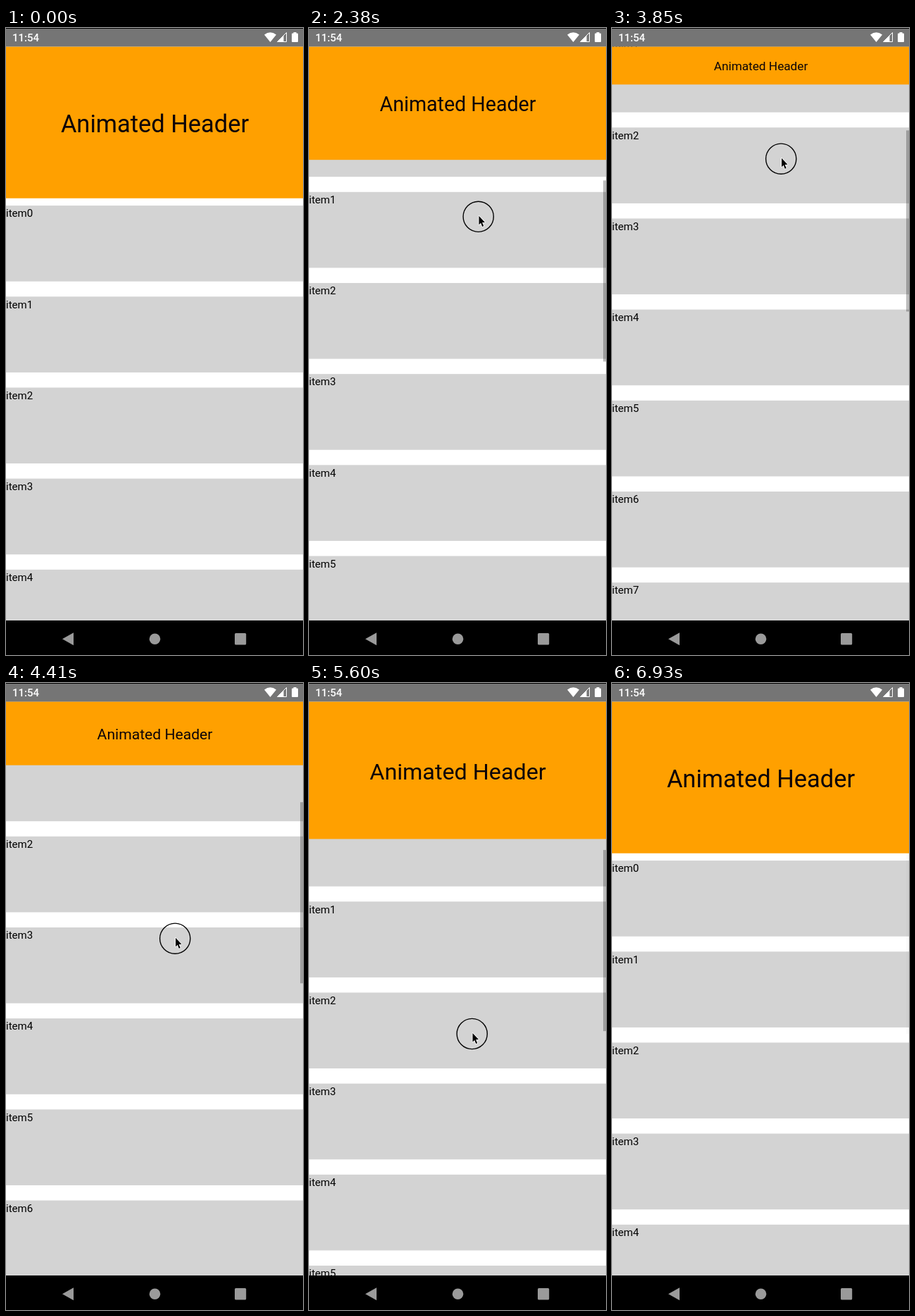
Animation of 422x890 px, one loop 7.21 s. Source, as an HTML page with a canvas:

```html
<!DOCTYPE html>
<html lang="en">
<head>
<meta charset="utf-8">
<title>Animated Header</title>
<style>
  html, body { margin: 0; width: 100%; height: 100%; overflow: hidden; background: #fff; }
  canvas { display: block; width: 422px; height: 890px; }
</style>
</head>
<body>
<canvas id="stage" width="422" height="890"></canvas>
<script>
const ctx = document.getElementById('stage').getContext('2d');
const LOOP = 7210, STEP = 70;
const WIDTH = 422, HEIGHT = 890, TOP = 26, BOTTOM = 841;
const DP = WIDTH / 392;
const HEADER_MAX = 200 * DP, HEADER_MIN = 50 * DP;
const ITEM = 100 * DP, MARGIN = 10 * DP, PITCH = 120 * DP;
const ITEMS = 20, VIEW = BOTTOM - TOP, CONTENT = ITEMS * PITCH;

// Turning points of the hand: time, x, y.
const HAND = [
  [70, 2, 880], [560, 321, 131], [1120, 241, 581], [1400, 262, 547], [1680, 243, 337],
  [2100, 246, 533], [2480, 240, 215], [2860, 233, 522], [3150, 233, 522], [3400, 240.5, 578],
  [3800, 240.5, 185], [4135, 240.5, 170], [4505, 240.5, 396], [4900, 242, 386.5],
  [5220, 240, 205], [5500, 232, 497], [5600, 232, 496.5], [5900, 232, 216],
  [6130, 228, 570], [6440, 228, 570], [6860, 198, 892]
];
// The list follows the finger from `grab` on, measured from `anchor`.
const DRAGS = [
  { down: 1680, grab: 2100, up: 2870, anchor: 533 },
  { down: 3360, grab: 3400, up: 6130, anchor: 568 }
];
const LAG = 98;

const clamp = (v, lo, hi) => Math.min(hi, Math.max(lo, v));
const ease = u => (1 - Math.cos(Math.PI * u)) / 2;

function hand(t) {
  const next = clamp(HAND.findIndex(p => p[0] > t), 1, HAND.length - 1);
  const [t0, x0, y0] = HAND[next - 1], [t1, x1, y1] = HAND[next];
  const u = ease(clamp((t - t0) / (t1 - t0), 0, 1));
  return { x: x0 + (x1 - x0) * u, y: y0 + (y1 - y0) * u };
}

// Splits the list's upward shift into header shrinkage and scrolling.
function layout(t) {
  const late = t - LAG;
  const drag = DRAGS.find(d => late >= d.grab && late < d.up);
  const shift = drag ? Math.max(0, drag.anchor - hand(late).y) : 0;
  const lead = 22 * shift / Math.hypot(shift, 74);
  const shrink = Math.min(shift / 2 - lead + lead * 0, HEADER_MAX - HEADER_MIN);
  const visible = Math.max(0, shrink);
  return { height: HEADER_MAX - visible, scroll: shift - visible };
}

function rect(color, x, y, w, h) {
  ctx.fillStyle = color;
  ctx.fillRect(x, y, w, h);
}

function polygon(points) {
  ctx.beginPath();
  points.forEach(([x, y]) => ctx.lineTo(x, y));
  ctx.closePath();
}

function disc(x, y, r) {
  ctx.beginPath();
  ctx.arc(x, y, r, 0, 2 * Math.PI);
}

function label(text, x, y, size, weight = 400) {
  ctx.font = `${weight} ${size}px Roboto, sans-serif`;
  ctx.fillText(text, x, y);
}

function drawList(top, scroll) {
  for (let i = 0; i < ITEMS; i++) {
    const y = top + MARGIN + i * PITCH - scroll;
    if (y > BOTTOM) break;
    rect('#d3d3d3', 0, y, WIDTH, ITEM);
    ctx.fillStyle = '#000';
    label('item' + i, 0, y + 16.3, 14 * DP);
  }
}

function drawScrollbar(t, top, scroll) {
  if (t < DRAGS[0].grab + LAG) return;
  const fade = clamp((6950 - t) / 270, 0, 1);
  rect(`rgba(0,0,0,${0.26 * fade})`, 418, top + scroll * VIEW / CONTENT, 4, VIEW * VIEW / CONTENT);
}

function drawHeader(height) {
  const top = TOP + 0.4;
  rect('#ffa000', 0, top, WIDTH, height);
  const size = 32 * DP - (HEADER_MAX - height) * 16 / 150;
  ctx.textAlign = 'center';
  ctx.fillStyle = '#0c0408';
  label('Animated Header', WIDTH / 2 + 0.5, top + height / 2 + size * 0.3925 + 0.4, size);
  ctx.textAlign = 'left';
}

function drawStatusBar() {
  rect('#757575', 0, 0, WIDTH, TOP + 0.4);
  rect('#000', 0, 0, WIDTH, 1);
  ctx.fillStyle = '#fff';
  label('11:54', 9, 19, 15, 500);

  ctx.beginPath();
  ctx.moveTo(375.5, 20);
  ctx.lineTo(367, 9.5);
  ctx.quadraticCurveTo(375.5, 3, 384, 9.5);
  ctx.fill();

  polygon([[385.5, 19.5], [398.5, 6.5], [398.5, 19.5]]);
  ctx.strokeStyle = '#fff';
  ctx.lineWidth = 1;
  ctx.stroke();
  polygon([[385.5, 19.5], [394.5, 10.5], [394.5, 19.5]]);
  ctx.fill();

  ctx.fillRect(408.5, 6, 4, 2);
  ctx.beginPath();
  ctx.roundRect(406, 7.5, 9, 12.5, 1);
  ctx.fill();
}

function drawNavBar() {
  rect('#000', 0, BOTTOM, WIDTH, HEIGHT - BOTTOM);
  ctx.fillStyle = '#9a9a9a';
  polygon([[80, 867.3], [96, 858.3], [96, 876.3]]);
  ctx.fill();
  disc(211.5, 867.3, 7.8);
  ctx.fill();
  ctx.beginPath();
  ctx.roundRect(325, 859, 16.2, 16.6, 1.5);
  ctx.fill();
}

function drawHand(t) {
  if (t < HAND[0][0] || t > HAND[HAND.length - 1][0]) return;
  const { x, y } = hand(t);
  if (DRAGS.some(d => t >= d.down && t < d.up)) {
    disc(x - 0.3, y + 1.5, 21.6);
    ctx.strokeStyle = '#000';
    ctx.lineWidth = 1.4;
    ctx.stroke();
  }
  ctx.save();
  ctx.translate(x, y);
  polygon([[0.5, 0.5], [0.5, 13], [3.2, 10.5], [5.2, 15.6], [7.2, 14.7], [5.1, 9.8], [9, 9.6]]);
  ctx.lineJoin = 'round';
  ctx.lineWidth = 1.6;
  ctx.strokeStyle = '#fff';
  ctx.stroke();
  ctx.fillStyle = '#000';
  ctx.fill();
  ctx.restore();
}

function draw(t) {
  const { height, scroll } = layout(t);
  const listTop = TOP + height;
  rect('#fff', 0, 0, WIDTH, HEIGHT);
  drawList(listTop, scroll);
  drawScrollbar(t, listTop, scroll);
  drawHeader(height);
  drawStatusBar();
  drawNavBar();
  drawHand(t);
}

const start = performance.now();
function tick() {
  const t = (performance.now() - start) % LOOP;
  draw(Math.floor(t / STEP) * STEP);
  requestAnimationFrame(tick);
}
tick();
</script>
</body>
</html>
```
